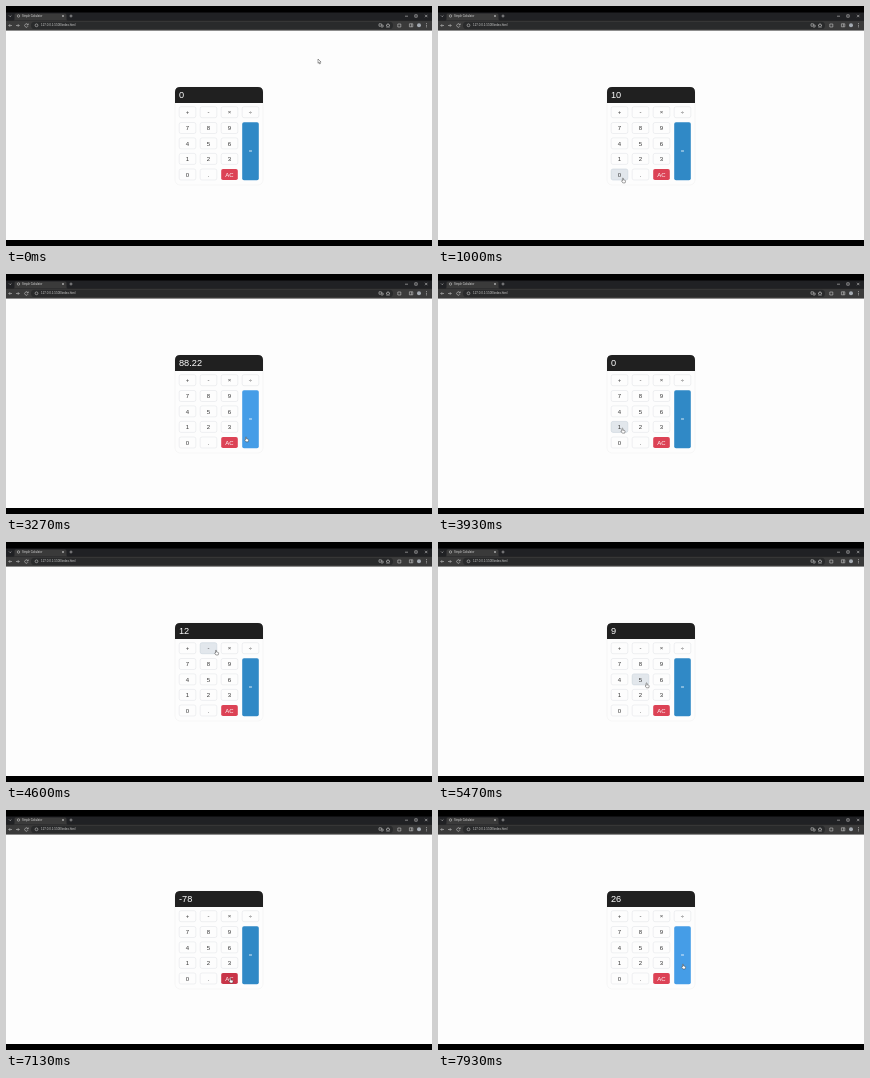
An HTML page that plays this animation: 426x240 px, repeating every 8 s.

```html
<!DOCTYPE html>
<html lang="en">
<head>
<meta charset="utf-8">
<title>Calculator</title>
<style>
html, body { margin: 0; width: 100%; height: 100%; overflow: hidden; background: #000; }
svg { display: block; width: 100vw; height: 100vh; }
text { font-family: "Liberation Sans", Arial, sans-serif; }
.key text { font-size: 6px; text-anchor: middle; fill: #333; }
.key rect { fill: #fdfdfd; stroke: #e4e6ea; stroke-width: .6; }
.key.hover rect { fill: #e2e7ec; stroke: #c9d3dc; }
.key.equal rect { fill: #3089c6; stroke: none; }
.key.equal.hover rect { fill: #459de7; }
.key.clear rect { fill: #dc4255; stroke: none; }
.key.clear.hover rect { fill: #c83548; }
.key.equal text, .key.clear text { fill: #fff; }
.icons { fill: none; stroke: #c4c4c4; stroke-width: .6; }
</style>
</head>
<body>
<svg viewBox="0 0 426 240">
  <rect width="426" height="240" fill="#000"/>
  <rect y="6.5" width="426" height="8" fill="#202124"/>
  <path d="M7 14.5Q8.5 14.5 8.5 13V9Q8.5 7.5 10 7.5H59Q60.5 7.5 60.5 9V13Q60.5 14.5 62 14.5Z" fill="#3a3a3a"/>
  <rect y="14.5" width="426" height="10" fill="#3a3a3a"/>
  <rect x="25" y="15.7" width="362" height="7.3" rx="3.6" fill="#292a2b"/>
  <g class="icons">
    <path d="M3 9.5l1.2 1.2 1.2-1.2M56 9l2 2m0-2l-2 2M63.5 10h3M65 8.5v3"/>
    <circle cx="12.5" cy="10" r="1.2"/>
    <path d="M6 19.5H2.8m1.3-1.3l-1.3 1.3 1.3 1.3M10 19.5h3.2m-1.3-1.3l1.3 1.3-1.3 1.3"/>
    <path d="M22 18.8a1.7 1.7 0 1 0 0 1.4M22.2 17.5v1.4h-1.4"/>
    <circle cx="30.5" cy="19.3" r="1.4"/>
    <path d="M399 10.2h3M408.8 8.8h2.4v2.4h-2.4zM419 8.8l2.4 2.4m0-2.4l-2.4 2.4"/>
    <path d="M373 17.8h2.4v2.4H373zM375.5 19h1.6v2h-2"/>
    <path d="M382 17.5l.6 1.3 1.4.2-1 1 .2 1.4-1.2-.7-1.2.7.2-1.4-1-1 1.4-.2z"/>
    <path d="M391.8 18h3v3h-3zM403.4 17.8h3.4v3h-3.4zm2 0v3"/>
  </g>
  <circle cx="413" cy="19.3" r="2" fill="#a5abb2"/>
  <path d="M420.5 17.3v.8m0 .8v.8m0 .8v.8" stroke="#ccc" stroke-width=".8"/>
  <text x="16" y="11" font-size="2.6" fill="#d6d6d6">Simple Calculator</text>
  <text x="35" y="20.4" font-size="3" fill="#d0d0d0">127.0.0.1:5500/index.html</text>

  <rect y="24.5" width="426" height="209.5" fill="#fdfdfd"/>
  <rect x="169" y="81" width="88" height="98" rx="5" fill="#fdfdfd" stroke="#eeeeee" stroke-width=".5"/>
  <path d="M169 97V86Q169 81 174 81H252Q257 81 257 86V97Z" fill="#202020"/>
  <text id="screen" x="173" y="92" font-size="9.2" fill="#fff">0</text>
  <g id="keys"></g>
  <g id="pointer" stroke="#333" stroke-width=".45" stroke-linejoin="round" fill="#fff">
    <path id="arrow" d="M0 0V4.3L1 3.4 1.7 5 2.4 4.7 1.7 3.1H3.1Z"/>
    <path id="hand" d="M-.5 .4Q0-.3.5.4V2L2.2 2.4Q2.8 2.6 2.6 3.4L2.2 5H-.1L-1.4 3.2Q-1.2 2.4-.5 3Z"/>
  </g>
</svg>
<script>
const DURATION = 8000, STEP = 1000 / 15;
const columns = [181.5, 202.5, 223.5, 244.5];
const rows = [106.2, 122, 137.4, 152.9, 168.5];
const labels = ["+-×÷", "789", "456", "123", "0."];

// time, x, y of the pointer tip
const route = [
  [0, 312, 53], [120, 300, 63], [500, 184, 152], [660, 183, 153],
  [860, 184, 171], [1030, 185, 172], [1220, 203, 169], [1330, 203, 169],
  [1520, 205, 154], [1830, 205, 153], [2150, 178, 111], [2360, 177, 111],
  [2500, 182, 122], [2600, 183, 122], [2730, 203, 122], [2820, 204, 123],
  [3080, 240, 162], [3320, 240, 163], [3520, 225, 169], [3660, 224, 169],
  [3880, 184, 154], [3990, 184, 153], [4120, 204, 153], [4230, 205, 152],
  [4500, 210, 108], [4660, 210, 108], [4980, 224, 122], [5250, 225, 122],
  [5750, 184, 169], [6070, 185, 169], [6400, 205, 151], [6640, 242, 148],
  [6800, 242, 148], [7000, 225, 168], [7120, 224, 168], [7300, 205, 153],
  [7420, 205, 153], [7580, 224, 139], [7700, 225, 139], [7870, 245, 154], [8000, 245, 155]
];
const readings = [
  [0, "0"], [600, "1"], [930, "10"], [1270, "10."], [1600, "10.2"], [1730, "10.22"],
  [2530, "7"], [2800, "78"], [3200, "88.22"], [3600, "0"], [3930, "1"], [4200, "12"],
  [5070, "9"], [5930, "90"], [6730, "-78"], [7070, "0"], [7400, "2"], [7660, "26"]
];

const find = id => document.getElementById(id);
const screen = find("screen"), pointer = find("pointer");
const arrow = find("arrow"), hand = find("hand");
const keys = [];

function make(name, attrs, parent) {
  const node = document.createElementNS("http://www.w3.org/2000/svg", name);
  for (const key in attrs) node.setAttribute(key, attrs[key]);
  return parent.appendChild(node);
}

function addKey(label, cx, cy, height = 11, kind = "") {
  const node = make("g", { class: "key " + kind }, find("keys"));
  make("rect", { x: cx - 8.3, y: cy - height / 2, width: 16.6, height, rx: 1.8 }, node);
  make("text", { x: cx, y: cy + 2.1 }, node).textContent = label;
  keys.push({ node, cx, cy, height });
}

labels.forEach((line, r) => [...line].forEach((label, c) => addKey(label, columns[c], rows[r])));
addKey("AC", columns[2], rows[4], 11, "clear");
addKey("=", columns[3], 145.2, 58, "equal");

function position(time) {
  const i = Math.max(1, route.findIndex(p => p[0] > time));
  const [t0, x0, y0] = route[i - 1], [t1, x1, y1] = route[i];
  const u = (time - t0) / (t1 - t0), e = u * u * (3 - 2 * u);
  return [x0 + (x1 - x0) * e, y0 + (y1 - y0) * e];
}

function draw(time) {
  const [x, y] = position(time);
  let over = false;
  for (const { node, cx, cy, height } of keys) {
    const hit = Math.abs(x - cx) < 8.5 && Math.abs(y - cy) < height / 2;
    node.classList.toggle("hover", hit);
    over = over || hit;
  }
  pointer.setAttribute("transform", `translate(${x} ${y})`);
  arrow.style.display = over ? "none" : "";
  hand.style.display = over ? "" : "none";
  screen.textContent = readings.filter(r => r[0] <= time).pop()[1];
}

const start = performance.now();
function tick() {
  const time = (performance.now() - start) % DURATION;
  draw(Math.floor(time / STEP + .01) * STEP % DURATION);
  requestAnimationFrame(tick);
}
tick();
</script>
</body>
</html>
```
